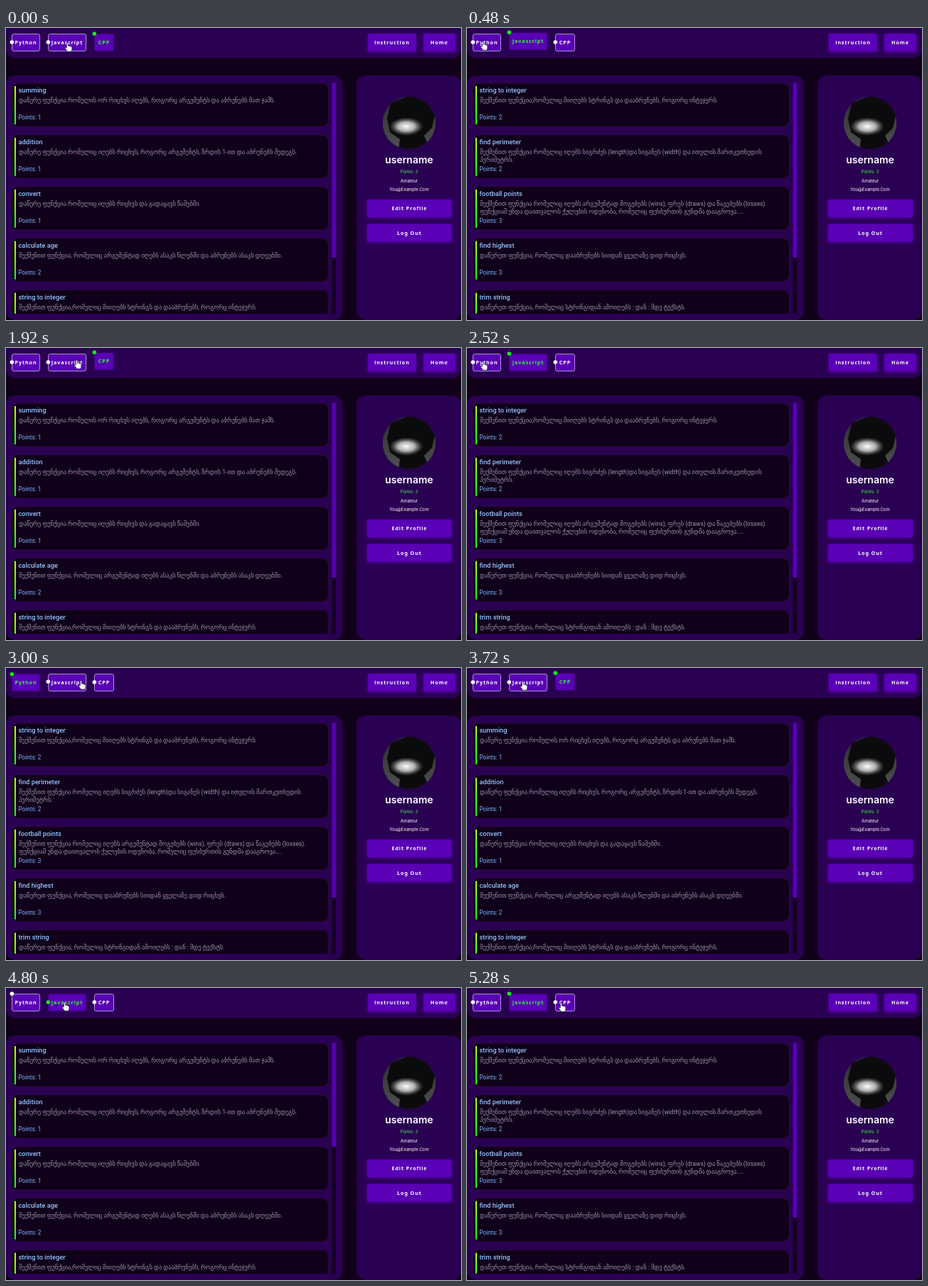
An HTML page that plays this animation: 640x412 px, repeating every 5400 ms.

```html
<!DOCTYPE html>
<html lang="en">
<head>
<meta charset="utf-8">
<title>Exercises</title>
<style>
html, body { margin: 0; width: 100%; height: 100%; overflow: hidden; background: #10001a; }
svg { display: block; width: 640px; height: 412px; }
.btn { font: 700 7.2px "Noto Sans", sans-serif; letter-spacing: .9px; fill: #fff; text-anchor: middle; }
.title { font: 500 9.3px Roboto, sans-serif; fill: #93c3ff; }
.points { font: 400 8.2px Roboto, sans-serif; fill: #7db6ff; }
.desc { font: 400 8.5px Roboto, "DejaVu Sans", sans-serif; fill: #9c96a6; }
.name { font: 600 14px Inter, sans-serif; fill: #fff; text-anchor: middle; }
.info { font: 400 6px Inter, sans-serif; fill: #fff; text-anchor: middle; }
</style>
</head>
<body>
<svg id="stage" viewBox="0 0 640 412">
  <defs>
    <linearGradient id="bar" x2="0" y2="1">
      <stop offset="0" stop-color="#b8f800"/><stop offset="1" stop-color="#18f010"/>
    </linearGradient>
    <linearGradient id="grey" x2="0" y2="1">
      <stop offset="0" stop-color="#2c2c2e"/><stop offset="1" stop-color="#505052"/>
    </linearGradient>
    <radialGradient id="light">
      <stop offset="0" stop-color="#fff"/><stop offset=".5" stop-color="#ccc" stop-opacity=".85"/>
      <stop offset="1" stop-color="#777" stop-opacity="0"/>
    </radialGradient>
    <filter id="glow" x="-20%" y="-50%" width="140%" height="200%">
      <feDropShadow dx="0" dy="1" stdDeviation="2.5" flood-color="#6500d0" flood-opacity=".7"/>
    </filter>
    <clipPath id="view"><rect x="0" y="77" width="473" height="326"/></clipPath>
    <clipPath id="round"><circle cx="567" cy="134" r="37.2"/></clipPath>
  </defs>
  <rect width="640" height="412" fill="#10001a"/>
  <g fill="#2a0052">
    <rect y="-20" width="640" height="62.5" rx="12"/>
    <rect y="67" width="473.5" height="345" rx="13"/>
    <rect x="493" y="67" width="147" height="345" rx="13"/>
  </g>
  <rect x="458.5" y="77" width="5.5" height="326" fill="#12001e"/>
  <rect id="thumb" x="458.5" y="77" width="5.5" height="247" rx="1.5" fill="#5700b4"/>
  <g clip-path="url(#round)">
    <rect x="529" y="96" width="76" height="76" fill="url(#grey)"/>
    <path d="M536 128L541 106L566 96L592 99L605 117L599 141L588 152L598 172H552L554 157L540 147Z" fill="#0b0b0d"/>
    <ellipse cx="563" cy="139" rx="24" ry="13" fill="url(#light)"/>
  </g>
</svg>
<script>
const LOOP = 5400, STEP = 120;
const stage = document.getElementById("stage");

function add(parent, tag, attrs, text) {
  const el = document.createElementNS("http://www.w3.org/2000/svg", tag);
  for (const key in attrs) el.setAttribute(key, attrs[key]);
  if (text) el.textContent = text;
  return parent.appendChild(el);
}
const label = (parent, cls, x, y, text) => add(parent, "text", { class: cls, x, y }, text);

function button(x, y, width, text, filter = "url(#glow)") {
  const g = add(stage, "g", {});
  const box = add(g, "rect", { x, y, width, height: 25, rx: 2.5, fill: "#5a00b6", filter });
  const caption = label(g, "btn", x + width / 2, y + 15, text);
  return { g, box, caption };
}

const basics = [
  ["summing", 1, "დაწერე ფუნქცია რომელის ორ რიცხვს იღებს, როგორც არგუმენტს და აბრუნებს მათ ჯამს."],
  ["addition", 1, "დაწერე ფუნქცია რომელიც იღებს რიცხვს, როგორც არგუმენტს, ზრდის 1-ით და აბრუნებს შედეგს."],
  ["convert", 1, "დაწერე ფუნქცია რომელიც იღებს რიცხვს და გადაყავს წამებში."],
  ["calculate age", 2, "შექმენით ფუნქცია, რომელიც არგუმენტად იღებს ასაკს წლებში და აბრუნებს ასაკს დღეებში."],
  ["string to integer", 2, "შექმენით ფუნქცია,რომელიც მიიღებს სტრინგს და დააბრუნებს, როგორც ინტეჯერს."]
];
const harder = [
  basics[4],
  ["find perimeter", 2, "შექმენით ფუნქცია რომელიც იღებს სიგრძეს (length)და სიგანეს (width) და ითვლის მართკუთხედის", "პერიმეტრს."],
  ["football points", 3, "შექმენით ფუნქცია რომელიც იღებს არგუმენტად მოგებებს (wins), ფრეს (draws) და წაგებებს (losses).",
    "ფუნქციამ უნდა დაითვალოს ქულების ოდენობა, რომელიც ფეხბურთის გუნდმა დააგროვა...."],
  ["find highest", 3, "დაწერეთ ფუნქცია, რომელიც დააბრუნებს სიიდან ყველაზე დიდ რიცხვს."],
  ["trim string", 3, "დაწერეთ ფუნქცია, რომელიც სტრინგიდან ამოიღებს : დან : მდე ტექსტს."]
];

function buildList(tasks) {
  const list = add(stage, "g", { "clip-path": "url(#view)" });
  tasks.forEach(([title, points, ...lines], i) => {
    const y = 78 + i * 72.9;
    add(list, "rect", { x: 8.5, y, width: 445, height: 61, rx: 9, fill: "#10001a", stroke: "#28143a", "stroke-width": .8 });
    add(list, "rect", { x: 11.8, y: y + 4, width: 2.2, height: 54, fill: "url(#bar)" });
    label(list, "title", 17.5, y + 13.2, title);
    lines.forEach((line, n) => label(list, "desc", 18, y + 27.3 + n * 10.4, line));
    label(list, "points", 17.5, y + 51.3, "Points: " + points);
  });
  return list;
}
const lists = [buildList(basics), buildList(harder)];

button(509, 8, 68, "instruction");
button(587, 8, 45, "Home");
button(508, 242, 119, "Edit Profile");
button(508, 276.5, 119, "Log Out");
label(stage, "name", 567, 190.5, "username");
label(stage, "info", 567, 204.7, "Points: 3").style.fill = "#3cf53c";
label(stage, "info", 567, 217.7, "Amateur");
label(stage, "info", 567, 230.4, "You@Example.Com");

const tabs = [["Python", 8, 39], ["Javascript", 59, 53], ["CPP", 124, 27]].map(([text, x, width]) => {
  const tab = button(x + .5, 8, width, text, "none");
  tab.box.setAttribute("y", 8.5);
  tab.box.setAttribute("height", 24);
  tab.dot = add(tab.g, "circle", { cx: x + .3, cy: 20, r: 2.8 });
  return tab;
});

const hand = add(stage, "path", {
  d: "M-2.6 1V-5Q-1.5-6.6-.5-5V-1.6Q.6-2.4 1.3-1.2Q2.4-1.9 3-.8Q4.4-1.2 4.6.2V2.6Q4.6 4.4 3.6 6H-1.4Q-2.6 4-4.6 1.6Q-4.6-.2-2.6 1Z",
  fill: "#fff", stroke: "#222", "stroke-width": .7
});

// [time, tab]
const PY = 0, JS = 1, CPP = 2;
const clicks = [[-1200, JS], [-600, CPP], [120, JS], [720, PY], [1560, CPP], [2040, JS],
  [2820, PY], [3300, CPP], [3840, JS], [4440, PY], [4800, JS]];

// [time, x, y]
const path = [[0, 88, 27], [120, 84, 26], [480, 24, 25], [720, 22, 25], [960, 86, 24], [1200, 130, 24],
  [1560, 136, 25], [1920, 101, 23], [2040, 88, 24], [2160, 84, 25], [2520, 24, 25], [2820, 22, 25],
  [3000, 107, 24], [3120, 132, 25], [3360, 136, 26], [3720, 80, 25], [3960, 78, 25], [4320, 21, 25],
  [4440, 21, 25], [4680, 76, 25], [4800, 84, 26], [5280, 134, 27], [LOOP, 136, 27]];

function pointAt(t) {
  const i = path.findIndex(p => p[0] > t);
  const [t0, x0, y0] = path[i - 1], [t1, x1, y1] = path[i];
  const k = (t - t0) / (t1 - t0);
  return [x0 + (x1 - x0) * k, y0 + (y1 - y0) * k];
}

function hop(age) {
  if (age < 180 || age > 480) return 0;
  return -2.5 * Math.sin(Math.PI * Math.pow((age - 180) / 300, .6));
}

function draw(t) {
  const n = clicks.filter(c => c[0] <= t).length - 1;
  const [start, active] = clicks[n], previous = clicks[n - 1][1];
  const age = t - start;
  const rise = 12 * (1 - Math.pow(1 - Math.min(1, age / 240), 2));

  tabs.forEach(({ g, box, caption, dot }, i) => {
    const on = i === active;
    g.setAttribute("transform", `translate(0 ${on ? hop(age) : 0})`);
    box.setAttribute("stroke", on ? "none" : "#c9b6e0");
    box.setAttribute("stroke-width", .8);
    caption.style.fill = on ? "#3cf53c" : "#fff";
    dot.setAttribute("fill", on ? "#10f010" : "#fff");
    dot.setAttribute("cy", on ? 20 - rise : i === previous ? 8 + rise : 20);
  });

  const shown = age >= 210 ? active : previous;
  lists.forEach((list, i) => list.style.display = (shown === JS) === (i === 1) ? "" : "none");
  document.getElementById("thumb").setAttribute("height", shown === PY ? 147 : 247);
  hand.setAttribute("transform", `translate(${pointAt(t)}) scale(1.05)`);
}

function tick() {
  const t = performance.now() % LOOP;
  draw(Math.floor(t / STEP) * STEP);
  requestAnimationFrame(tick);
}
tick();
</script>
</body>
</html>
```
